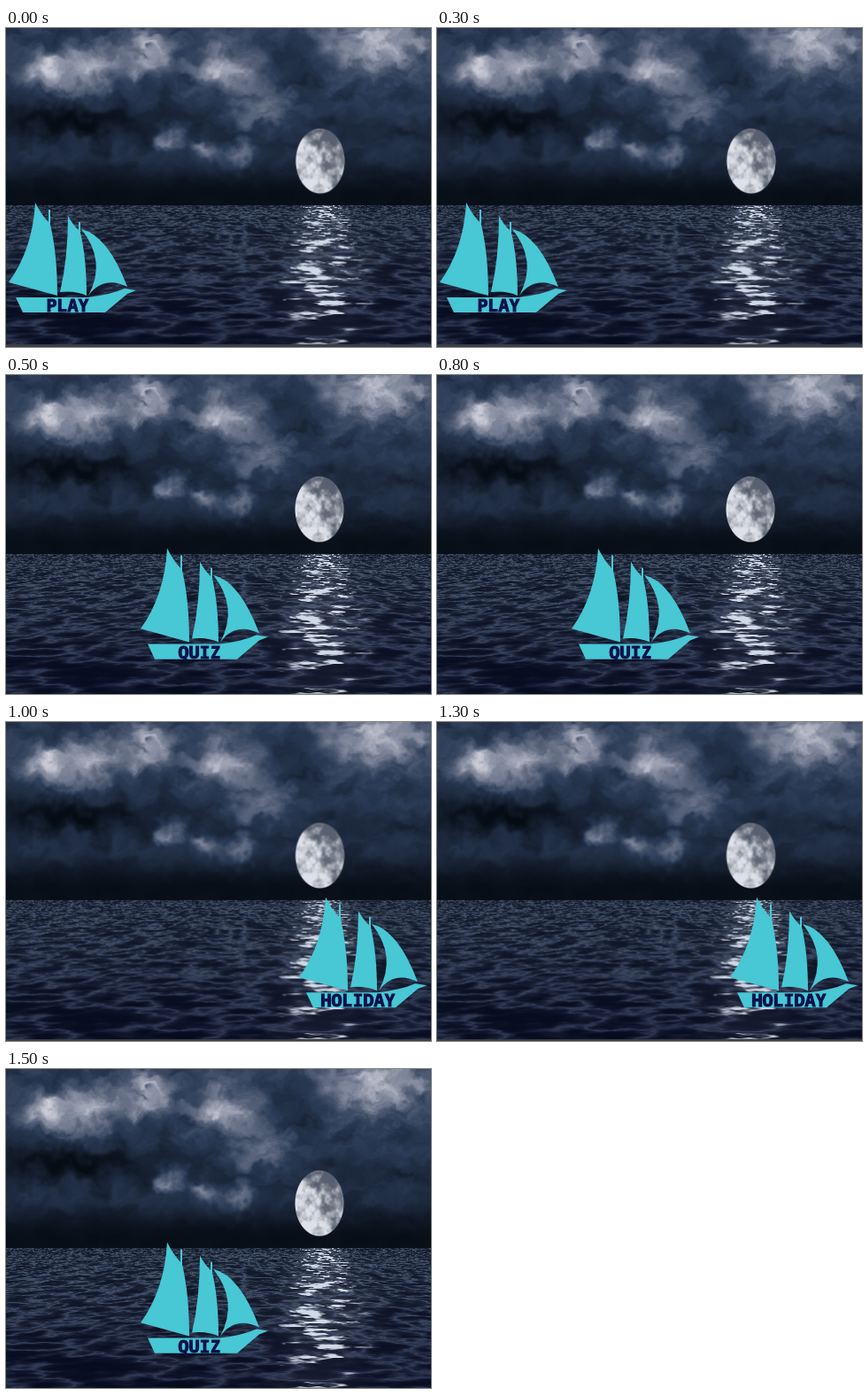
These frames come from a looping animation (480 px wide and 360 px high, 2000 ms). An HTML page with a canvas:

```html
<!DOCTYPE html>
<html lang="en">
<head>
<meta charset="utf-8">
<title>Moonlit sailing ship</title>
<style>
  html, body { margin: 0; width: 100%; height: 100%; overflow: hidden; background: #10141f; }
  canvas { display: block; }
</style>
</head>
<body>
<canvas id="stage" width="480" height="360"></canvas>
<script>
const W = 480, H = 360, HORIZON = 202, STEP = 500;
const ctx = document.getElementById('stage').getContext('2d');

const clamp = (v, lo = 0, hi = 1) => Math.min(hi, Math.max(lo, v));
const mix = (a, b, t) => a + (b - a) * t;
const smooth = (lo, hi, v) => { const t = clamp((v - lo) / (hi - lo)); return t * t * (3 - 2 * t); };
const mixColor = (a, b, t) => a.map((v, i) => mix(v, b[i], t));
const bump = (x, y, cx, cy, rx, ry) => Math.exp(-(((x - cx) / rx) ** 2) - ((y - cy) / ry) ** 2);

// Seeded value noise
function hash(x, y) {
  let h = Math.imul(x, 374761393) ^ Math.imul(y, 668265263);
  h = Math.imul(h ^ (h >>> 13), 1274126177);
  return ((h ^ (h >>> 16)) >>> 0) / 4294967296;
}
function noise(x, y) {
  const ix = Math.floor(x), iy = Math.floor(y);
  const tx = smooth(0, 1, x - ix), ty = smooth(0, 1, y - iy);
  return mix(mix(hash(ix, iy), hash(ix + 1, iy), tx),
             mix(hash(ix, iy + 1), hash(ix + 1, iy + 1), tx), ty);
}
function fbm(x, y, octaves) {
  let sum = 0, amp = 0.5, total = 0;
  for (let i = 0; i < octaves; i++) {
    sum += amp * noise(x, y);
    total += amp;
    x = x * 2 + 17; y = y * 2 + 31; amp /= 2;
  }
  return sum / total;
}

// Main cloud heads: x, y, radius
const puffs = [[45, 48, 24], [98, 46, 30], [158, 25, 28], [245, 45, 30], [290, 92, 28],
               [420, 14, 50], [182, 132, 15], [228, 140, 16], [264, 142, 14]];

function cloudLight(x, y) {
  const wx = x + 34 * (fbm(x / 18, y / 18, 4) - .5);
  const wy = y + 34 * (fbm(x / 18 + 50, y / 18 + 9, 4) - .5);
  const heads = puffs.reduce((sum, [cx, cy, r]) =>
    sum + bump(wx, wy, cx, cy, r, r * .85) * mix(.55, .28, cy / 150), 0);
  const haze = mix(mix(.3, .2, smooth(30, 130, y)), .035, smooth(140, 190, y));
  const shadow = .2 * bump(wx, wy, 70, 105, 100, 18) + .1 * bump(wx, wy, 325, 40, 40, 28);
  const texture = .5 + fbm(wx / 26, wy / 15, 5);
  return clamp((haze + heads - shadow) * texture, .015, 1);
}

function skyColor(x, y) {
  const light = cloudLight(x, y);
  const sky = light < .3
    ? mixColor([3, 9, 16], [43, 59, 86], light / .3)
    : mixColor([43, 59, 86], [182, 184, 198], (light - .3) / .6);

  const dx = (x - 353.5) / 27.5, dy = (y - 151) / 37, r = Math.hypot(dx, dy);
  if (r > 1.03) return sky;
  const shade = smooth(.3, .8, fbm(x / 11, y / 13, 4) + .16 * (dx - dy));
  const moon = mixColor([222, 225, 233], [88, 95, 110], shade);
  return mixColor(sky, moon, clamp((1 - r) * 28 + .5));
}

function seaColor(x, y) {
  const d = y - HORIZON, near = smooth(0, 150, d);
  const u = (x - 240) / (d + 14) * 3.2, v = Math.log(d + 14) * 17;
  const swell = fbm(u + v * .1, v, 4);
  const crest = Math.pow(1 - Math.abs(2 * swell - 1), 5);
  const water = mixColor(mixColor([17, 25, 40], [7, 11, 30], near),
                         mixColor([74, 90, 115], [48, 59, 86], near), crest);

  const width = 23 + Math.min(d, 90) * .32;
  const beam = bump(x, 0, 356, 0, width, 1) * mix(1, .5, near);
  const ripple = fbm(u * 1.3 + 80, v * 1.4 + 40, 4);
  const glint = smooth(.75 - beam * .3, .88 - beam * .25, ripple) * smooth(.03, .5, beam);
  return mixColor(water, [208, 217, 230], clamp(glint + beam * .12));
}

function paintBackdrop() {
  const canvas = document.createElement('canvas');
  canvas.width = W; canvas.height = H;
  const c = canvas.getContext('2d'), image = c.createImageData(W, H);
  for (let y = 0, i = 0; y < H; y++) {
    for (let x = 0; x < W; x++, i += 4) {
      image.data.set(y < HORIZON ? skyColor(x, y) : seaColor(x, y), i);
      image.data[i + 3] = 255;
    }
  }
  c.putImageData(image, 0, 0);
  return canvas;
}

// Rear sail, middle sail, jib, hull
const ship = new Path2D(`
  M33 197 Q30 250 3 287 L58 302 Q58 255 50 222 V205 H48 V219 Q40 211 33 197Z
  M70 212 Q70 260 61 298 Q78 296 91 302 Q91 260 84 231 V219 H82 V228 Q76 223 70 212Z
  M85 227 Q115 234 137 292 Q110 279 93 302 Q114 263 85 227Z
  M11 304 H92 Q118 301 134 294 L147 296 L137 300 L112 321 H19Z`);

const backdrop = paintBackdrop();
const baseHeight = 356.5;
const middle = { word: 'QUIZ', x: 149, y: -3.5, height: H };
const scenes = [
  { word: 'PLAY', x: 0, y: 0, height: baseHeight },
  middle,
  { word: 'HOLIDAY', x: 328, y: 0, height: 358 },
  middle
];

function draw({ word, x, y, height }) {
  ctx.fillStyle = '#3c3f45';
  ctx.fillRect(0, 0, W, H);
  ctx.drawImage(backdrop, 0, 0, W + (H - height) / 3, height);

  ctx.save();
  ctx.translate(x, y);
  ctx.scale(1, height / baseHeight);
  ctx.fillStyle = '#48c7d5';
  ctx.fill(ship);
  ctx.font = '900 20px "Noto Sans Mono", "DejaVu Sans Mono", monospace';
  ctx.textAlign = 'center';
  ctx.fillStyle = ctx.strokeStyle = '#0b1249';
  ctx.fillText(word, 69.5, 320);
  ctx.strokeText(word, 69.5, 320);
  ctx.restore();
}

const start = performance.now();
function tick() {
  const elapsed = Math.max(0, performance.now() - start);
  draw(scenes[Math.floor(elapsed / STEP) % scenes.length]);
  requestAnimationFrame(tick);
}
tick();
</script>
</body>
</html>
```
